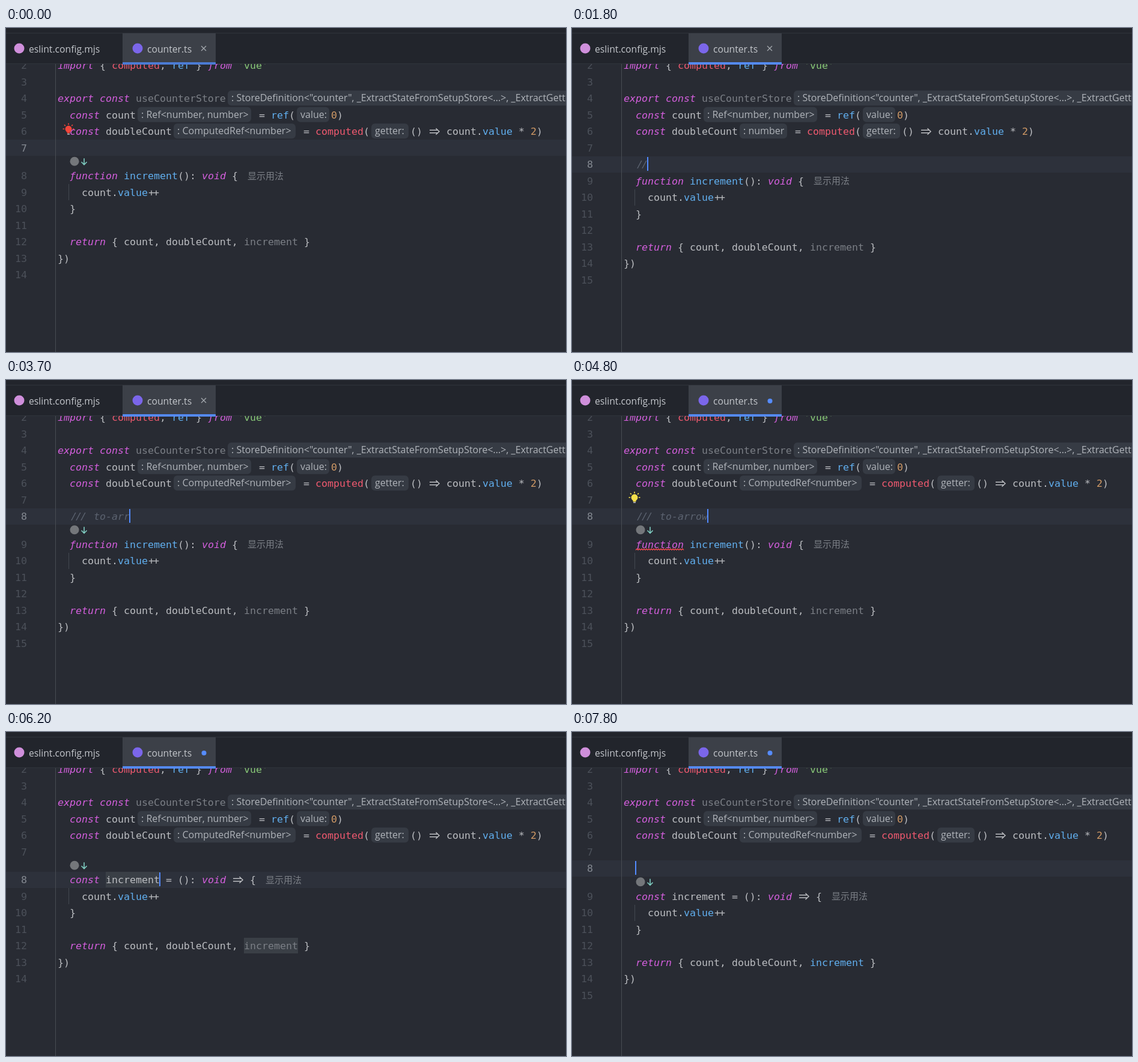
An HTML page with a canvas that plays this animation: 932 px wide and 540 px high, repeating every 8000 ms.

```html
<!DOCTYPE html>
<html lang="en">
<head>
<meta charset="utf-8">
<title>Editor: convert to arrow function</title>
<style>
html, body { margin: 0; height: 100%; overflow: hidden; background: #282b33; }
canvas { display: block; }
</style>
</head>
<body>
<canvas id="stage" width="932" height="540"></canvas>
<script>
const ctx = document.getElementById('stage').getContext('2d');
const LOOP = 8000, CHAR = 10, ROW = 27.5, INLAY = 19;
const MONO = '16.6px "DejaVu Sans Mono", monospace';
const SANS = '"Open Sans", "Noto Sans CJK SC", "Noto Sans CJK", sans-serif';
const UI = '15.7px ' + SANS, HINT = '16px ' + SANS;
const CJK = '15px "Noto Sans CJK SC", "Noto Sans CJK", sans-serif';
const FG = '#bbbdc1', KEY = '#d55fde', BLUE = '#61afef', RED = '#ef596f', STR = '#89ca78',
  NUM = '#d19a66', DIM = '#7b7f86', COMMENT = '#5c6370', LINK = '#548af7', CARET = '#528bff';

const COMMENT_TEXT = '/// to-arrow';
const KEY_TIMES = [1700, 1800, 1900, 2200, 2600, 2800, 3000, 3200, 3600, 3700, 3900, 4000];

// Token builders
const plain = (s, color = FG) => ({ s, color });
const key = s => ({ s: s.replace('f', 'ƒ'), color: KEY, italic: true });
const blue = s => plain(s, BLUE);
const hint = (s, width) => ({ s, hint: width });
const ARROW = { arrow: true }, PLUSPLUS = { plus: true };

function text(s, x, y, color, font = UI) {
  ctx.font = font;
  ctx.fillStyle = color;
  ctx.fillText(s, x, y);
}
function rect(x, y, w, h, color) {
  ctx.fillStyle = color;
  ctx.fillRect(x, y, w, h);
}
function round(x, y, w, h, r, color) {
  ctx.fillStyle = color;
  ctx.beginPath();
  ctx.roundRect(x, y, w, h, r);
  ctx.fill();
}
function disc(x, y, r, color) {
  ctx.fillStyle = color;
  ctx.beginPath();
  ctx.arc(x, y, r, 0, 7);
  ctx.fill();
}
function stroke(color, width, ...paths) {
  ctx.strokeStyle = color;
  ctx.lineWidth = width;
  ctx.beginPath();
  for (const p of paths)
    for (let i = 0; i < p.length; i += 2) i ? ctx.lineTo(p[i], p[i + 1]) : ctx.moveTo(p[i], p[i + 1]);
  ctx.stroke();
}

// Draws tokens on a row centred at y
function code(tokens, x, y) {
  for (const k of tokens) {
    if (k.hint) {
      round(x + 3, y - 13, k.hint, 25, 6, '#363b44');
      text(k.s, x + 9, y + 5, '#b0b4ba', HINT);
      x += k.hint + 6;
    } else if (k.arrow) {
      stroke(FG, 1.5, [x + 2, y - 2, x + 15, y - 2], [x + 2, y + 2.5, x + 15, y + 2.5],
        [x + 12.5, y - 5, x + 18, y + .2, x + 12.5, y + 5.5]);
      x += 2 * CHAR;
    } else if (k.plus) {
      text('+', x + 1, y + 6, FG, MONO);
      text('+', x + 9, y + 6, FG, MONO);
      x += 2 * CHAR;
    } else {
      text(k.s, x, y + 6, k.color, (k.italic ? 'italic ' : '') + MONO);
      x += k.s.length * CHAR;
    }
  }
  return x;
}

function bulb(y, color) {
  const x = 104;
  disc(x, y, 5.5, color);
  rect(x - 2.5, y + 4, 5, 3, color);
  rect(x - 2, y + 7.7, 4, 1.5, '#c5c8cc');
  stroke(color, 1.6, [x, y - 9.5, x, y - 7], [x - 9.5, y, x - 7, y], [x + 7, y, x + 9.5, y],
    [x - 7, y - 7, x - 5.2, y - 5.2], [x + 7, y - 7, x + 5.2, y - 5.2]);
}

function kebab(y) {
  for (const d of [-5, 0, 5]) disc(720, y + d, 2, '#f2d94e');
}

function tabs(t) {
  rect(0, 0, 932, 60, '#22252c');
  rect(0, 8, 932, 1, '#30343b');
  rect(0, 59, 932, 1, '#30343b');
  rect(194, 9, 155, 51, '#3c4048');
  rect(194, 57, 155, 4, t < 800 ? '#4b7bd4' : LINK);
  disc(22, 34, 8.5, '#cf8fdb');
  disc(219, 34, 8.5, '#7b66ea');
  text('eslint.config.mjs', 38, 41, '#c3c6cb');
  text('counter.ts', 235, 41, '#c3c6cb');
  if (t < 4400) stroke('#a4a8ae', 1.3, [325, 30, 333, 38], [333, 30, 325, 38]);
  else disc(329.5, 35, 4, '#568cff');
}

function fileIcon(x, y) {
  ctx.fillStyle = '#0f9b87';
  ctx.beginPath();
  for (const [dx, dy] of [[0, 0], [9, 0], [14, 5], [14, 16], [0, 16]]) ctx.lineTo(x + dx, y + dy);
  ctx.fill();
  stroke('#21242b', 1.4, [x + 6, y + 6, x + 3.5, y + 9, x + 6, y + 12], [x + 8, y + 6, x + 10.5, y + 9, x + 8, y + 12]);
}

function popup(t) {
  ctx.save();
  ctx.globalAlpha = Math.min(1, Math.floor((t - 5300) / 100) / 3);
  ctx.shadowColor = 'rgba(0,0,0,.4)';
  ctx.shadowBlur = 32;
  ctx.shadowOffsetY = 6;
  round(137, 288, 605, 238, 8, '#21242b');
  ctx.shadowColor = 'transparent';
  round(137, 288, 605, 78, [8, 8, 0, 0], '#2f353f');
  text('ESLint: [to-arrow] fix: Convert to arrow function(command/command)', 161, 316, '#bfc2c7');
  text("ESLint: 修复 'command/command'", 161, 347, LINK);
  if (t >= 5800) rect(161, 349, 246, 1, LINK);
  text('Alt+Shift+Enter', 420, 347, '#646973');
  text('更多操作...', 564, 347, LINK);
  text('Alt+Enter', 649, 347, '#646973');
  kebab(311);
  code([key('function'), blue(' increment'), plain('(): '), key('void')], 161, 397);
  rect(161, 418, 560, 1, '#3a3e46');
  text('/ to-arrow', 161, 453, '#bfc2c7');
  text('src/stores/counter.ts', 166, 496, '#bfc2c7');
  fileIcon(680, 485);
  kebab(493);
  ctx.restore();
}

function draw(t) {
  const within = (a, b) => t >= a && t < b;
  const commenting = within(1600, 6200);
  const extraLine = commenting || t >= 7800;
  const broken = within(1800, 2000);
  const fixed = t >= 6200;
  const onName = within(6200, 6900);
  const typed = commenting ? KEY_TIMES.filter(k => k <= t).length : 0;
  const caretLine = extraLine || onName ? 8 : 7;
  const caretX = onName ? 256 : extraLine ? 106 + typed * CHAR : 87;
  const caretOn = !(t < 800 || within(5000, 5400) || within(5900, 6200) || within(7600, 7800));
  const fnLine = extraLine ? 9 : 8;
  const rowY = n => 62.3 + ROW * (n - 2) + (n >= fnLine && !broken ? INLAY : 0);
  const fnY = rowY(fnLine), returnY = rowY(fnLine + 4);

  rect(0, 0, 932, 540, '#282b33');
  rect(0, Math.round(rowY(caretLine) - 13.5), 932, 27, '#2d313b');
  rect(82, 60, 1, 480, '#484c53');
  rect(104, Math.round(fnY + 14), 1, 27, '#434850');

  ctx.textAlign = 'right';
  for (let n = 2; n <= fnLine + 6; n++)
    text(n, 35, rowY(n) + 6, n === caretLine ? '#858a92' : '#4c515a', MONO);
  ctx.textAlign = 'left';

  if (onName) {
    rect(166, Math.round(fnY - 13), 90, 26, '#3a3f46');
    rect(396, Math.round(returnY - 13), 90, 26, '#3a3f46');
  }

  code([key('import'), plain(' { '), plain('computed', RED), plain(', '), blue('ref'), plain(' } '),
    key('from'), plain(" 'vue'", STR)], 86, rowY(2));
  code([key('export'), plain(' '), key('const'), plain(' useCounterStore', DIM),
    hint(': StoreDefinition<"counter", _ExtractStateFromSetupStore<...>, _ExtractGetters', 620)], 86, rowY(4));
  code([key('const'), plain(' count'), hint(': Ref<number, number>', 189), plain(' = '), blue('ref'),
    plain('('), hint('value:', 54), plain('0', NUM), plain(')')], 106, rowY(5));
  code([key('const'), plain(' doubleCount'),
    broken ? hint(': number', 79) : hint(': ComputedRef<number>', 203),
    plain(' = '), plain('computed', RED), plain('('), hint('getter:', 62), plain('() '), ARROW,
    plain(' count.'), blue('value'), plain(' * '), plain('2', NUM), plain(')')], 106, rowY(6));

  // Slashes sit closer together than other characters
  [...COMMENT_TEXT.slice(0, typed)].forEach((c, i) =>
    text(c, 106 + (i < 3 ? 2 + i * 8 : i * CHAR), rowY(8) + 6, COMMENT, 'italic ' + MONO));

  if (!broken) {
    const y = fnY - 24;
    disc(114, y, 7.5, '#74777b');
    stroke('#80cfc3', 1.6, [130, y - 5, 130, y + 5], [125.5, y + 1, 130, y + 5.5, 134.5, y + 1]);
  }

  const head = fixed
    ? [key('const'), plain(' increment = (): '), key('void'), plain(' '), ARROW, plain(' {')]
    : [key('function'), blue(' increment'), plain('(): '), key('void'), plain(' {')];
  const end = code(head, 106, fnY);
  text('显示用法', end + 16, fnY + 5.5, DIM, CJK);
  if (within(4500, 6200)) {
    const wave = [];
    for (let x = 106; x <= 186; x += 2) wave.push(x, fnY + 8.5 + (x % 4 ? 1.2 : -1.2));
    stroke('#e5484d', 1.2, wave);
  }
  code([plain('count.'), blue('value'), PLUSPLUS], 126, rowY(fnLine + 1));
  code([plain('}')], 106, rowY(fnLine + 2));
  code([key('return'), plain(' { count, doubleCount, '), plain('increment', t >= 6300 ? BLUE : DIM),
    plain(' }')], 106, returnY);
  code([plain('})')], 86, rowY(fnLine + 5));

  if (t < 800 || within(1300, 1600) || within(7400, 7800)) bulb(168.3, '#f2453a');
  if (within(4800, 6200)) bulb(195.8, '#f6e04b');
  if (caretOn) rect(caretX - 1, Math.round(rowY(caretLine) - 12.3), 2, 23, CARET);

  tabs(t);
  if (within(5400, 6100)) popup(t);
}

function frame() {
  draw(performance.now() % LOOP);
  requestAnimationFrame(frame);
}
frame();
</script>
</body>
</html>
```
